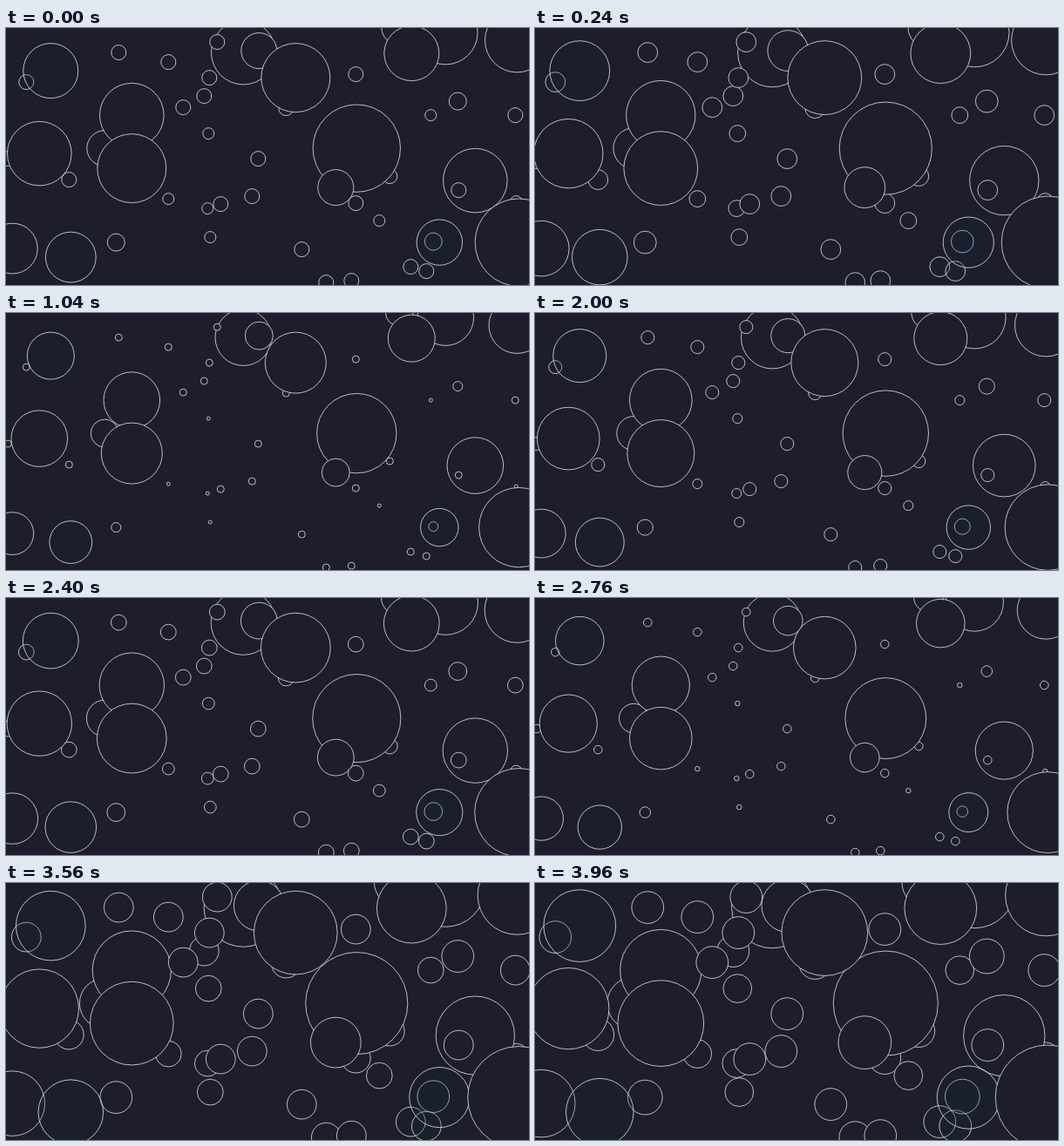
Recreate the animation shown at these times as an HTML page. Size 600 px wide and 295 px high, loop 4.04 s.

```html
<!DOCTYPE html>
<html lang="en">
<head>
<meta charset="utf-8">
<title>Pulsing circles</title>
<style>
  html, body { margin: 0; width: 100%; height: 100%; overflow: hidden; background: #1e1d2b; }
  svg { display: block; width: 100vw; height: 100vh; }
  circle { fill: #1e1d2b; stroke: #f0f0f4; stroke-width: .75; }
  .glass { fill: rgba(16, 40, 58, .2); }
</style>
</head>
<body>
<svg viewBox="0 0 600 295"><g id="bubbles" transform="translate(.3 .1)"></g></svg>
<script>
const LOOP = 4040, STEP = 40;
const group = document.getElementById("bubbles");
const bubbles = [];

// Adds circles of one resting radius on top of those already drawn.
function add(r, centres, look = "") {
  for (const [x, y] of centres) {
    const el = document.createElementNS("http://www.w3.org/2000/svg", "circle");
    el.setAttribute("cx", x);
    el.setAttribute("cy", y);
    el.setAttribute("class", look);
    group.append(el);
    bubbles.push({ el, r });
  }
}

// Specks at the back
add(4, [[2, 150], [72, 174], [321, 92], [440, 170], [401, 201], [227, 78], [23, 62]]);
add(2, [[585, 199], [186, 196], [231, 207], [232, 121], [234, 240], [487, 100], [428, 221]]);

// Large discs
add(16, [[113, 138], [451, -1]]);
add(32.3, [[272, 28], [144, 100], [38, 144], [504, 5], [586, 14], [538, 175]]);
add(16, [[290, 26]]);
add(45.7, [[402, 138]]);
add(35, [[332, 57], [144, 161]]);
add(27, [[465, 29]]);
add(16, [[378, 183]]);
add(24.4, [[7, 253]]);

// Specks in front
add(4, [[129, 28], [186, 39], [242, 16], [233, 57], [203, 91], [246, 202], [282, 193],
  [289, 150], [339, 254], [367, 292], [396, 290], [401, 53], [584, 100], [519, 186]]);
add(5.5, [[518, 84], [126, 246]]);

// See-through discs, then the one that covers them
add(4, [[464, 274], [482, 279]], "glass");
add(5.5, [[490, 245]], "glass");
add(24.4, [[74, 263]], "glass");
add(27, [[51, 49]], "glass");
add(21.7, [[497, 246]], "glass");
add(45.7, [[588, 246]]);

// Quick rise and slow fall, reaching its peak a third of the way through.
function hit(t, start, length, peak) {
  const u = (t - start) / length;
  return u > 0 && u < 1 ? peak * 6.75 * u * (1 - u) ** 2 : 0;
}

// Every radius grows by the same amount.
const swell = t => hit(t, -135, 1175, 7.4) + hit(t, 1880, 1040, 5.8) + hit(t, 3120, 2140, 14.7);

function draw(t) {
  const d = swell(Math.floor(t / STEP) * STEP);
  for (const { el, r } of bubbles) el.setAttribute("r", (r + d).toFixed(2));
}

const start = performance.now();
function tick() {
  draw((performance.now() - start) % LOOP);
  requestAnimationFrame(tick);
}
tick();
</script>
</body>
</html>
```
